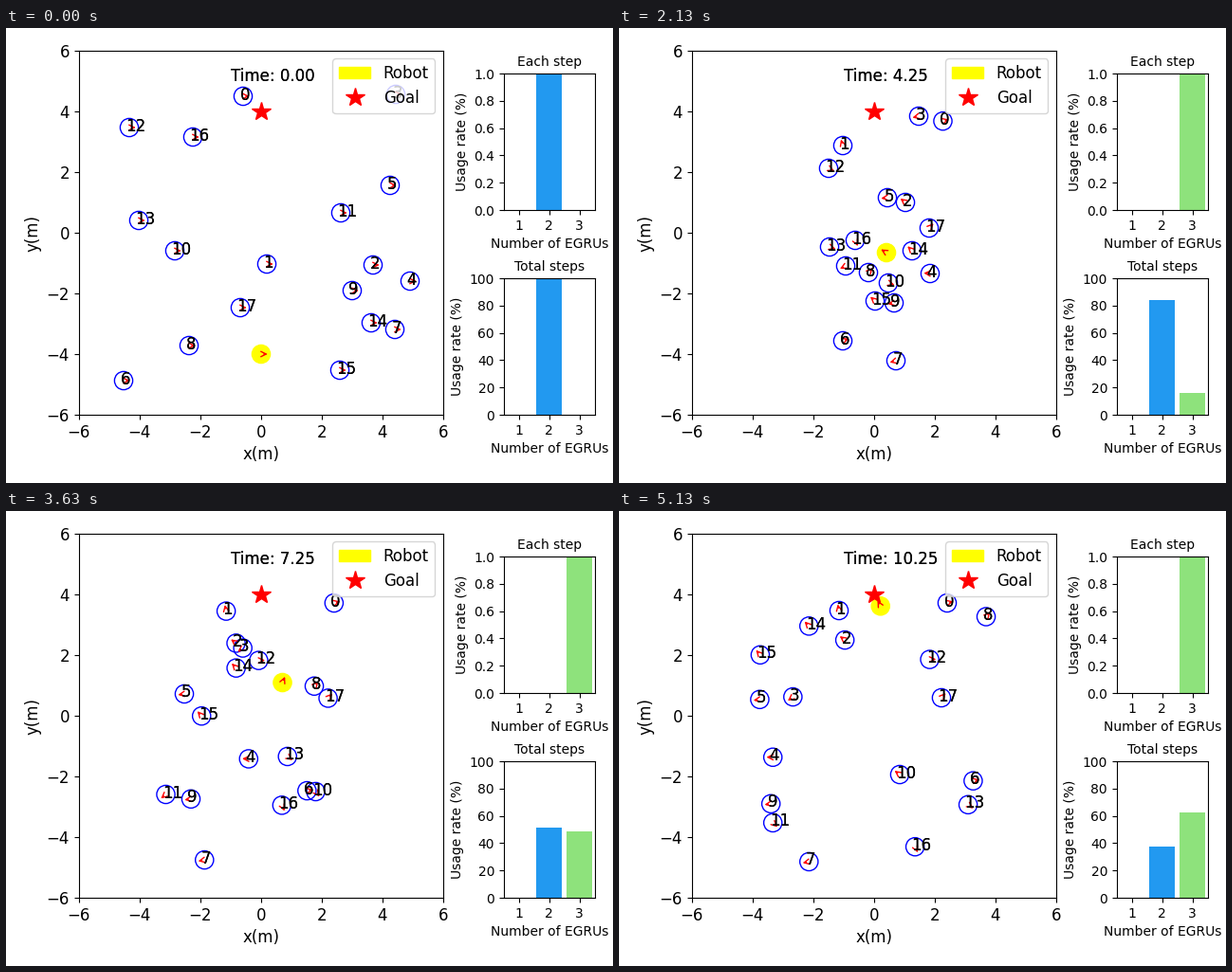
These frames come from a looping animation (640x480 px, 5.26 s). A matplotlib script:

```python
import numpy as np
import matplotlib.pyplot as plt
from matplotlib.animation import FuncAnimation
from matplotlib.lines import Line2D
from matplotlib.patches import ArrowStyle, Circle, FancyArrowPatch

LOOP_MS, STEPS, STEP = 5260, 42, 0.25
REPEAT = 3                     # drawn frames per simulation step
FRAMES = STEPS * REPEAT + 1    # the last step is held one frame longer
RADIUS, LABEL_OFFSET = 0.3, 0.11
STOPS = (17, 25, 33)           # steps at which walkers pass their stops
SWITCH = 15                    # step at which the unit count goes from 2 to 3
BAR_COLORS = ("white", "#2299f0", "#8ee27c")

plt.rcParams.update({"font.family": "DejaVu Sans", "font.size": 10})


def walk(start, stops, goal, steps=STOPS, speed=8, lag=2.3):
    """Ease off from start, pass the stops, then head for the goal and brake."""
    steps = steps[:len(stops)]
    t = np.arange(steps[-1] + 1.0)
    eased = t - lag * (1 - np.exp(-t / 2.5))
    t = np.where(t < steps[0], eased * steps[0] / eased[steps[0]], t)
    points = np.array([start, *stops], float)
    path = list(np.column_stack([np.interp(t, (0, *steps), axis) for axis in points.T]))
    while len(path) < STEPS:
        way = np.array(goal) - path[-1]
        path.append(path[-1] + way * min(speed / np.hypot(*way), STEP))
    return (np.array(path) - (268.8, 216)) / (32, -32)  # stage pixels to metres


robot_path = walk((269, 344),
                  [(284, 307), (299, 266), (297, 246), (282, 237), (267, 227), (279, 210), (304, 152)],
                  (269, 88), steps=(5, 12, 15, 17, 21, 25, 33), lag=0)

humans = [
    walk((250, 72), [(327, 102)], (346, 97), steps=(12,)),
    walk((275, 249), [(236, 124)], (232, 105), lag=0),
    walk((387, 250), [(302, 184)], (238, 136)),
    walk((411, 70), [(316, 93)], (150, 222), speed=7),
    walk((426, 267), [(328, 259), (287, 262)], (120, 259), speed=7.8),
    walk((405, 166), [(283, 179)], (147, 199)),
    walk((124, 372), [(236, 330), (291, 300)], (377, 284), speed=6.7),
    walk((410, 318), [(292, 351)], (200, 370)),
    walk((193, 335), [(263, 258)], (412, 82), lag=3.5),
    walk((365, 277), [(290, 290)], (159, 309)),
    walk((178, 235), [(284, 269), (319, 286), (334, 306)], (262, 253), speed=5.9),
    walk((353, 195), [(239, 251), (189, 282), (148, 316)], (180, 345), speed=2.4, lag=1),
    walk((130, 105), [(221, 148), (246, 158)], (360, 156), speed=5.1),
    walk((140, 203), [(222, 231), (273, 242)], (395, 329), speed=7.3),
    walk((385, 311), [(309, 235)], (198, 119), lag=3),
    walk((352, 361), [(270, 288)], (142, 144)),
    walk((197, 115), [(249, 224)], (313, 356)),
    walk((247, 295), [(327, 211)], (340, 197)),
]


def add_bars(bottom, title, top, ticks):
    ax = fig.add_axes((0.82, bottom, 0.15, 0.3))
    ax.set(xlim=(0.5, 3.5), ylim=(0, top), xticks=(1, 2, 3), yticks=ticks,
           xlabel="Number of EGRUs", ylabel="Usage rate (%)")
    ax.set_title(title, fontsize=10)
    return ax.bar((1, 2, 3), (0, 0, 0), width=0.85, color=BAR_COLORS)


def add_arrow():
    arrow = FancyArrowPatch((0, 0), (RADIUS, 0), color="red",
                            arrowstyle=ArrowStyle("->", head_length=4, head_width=2))
    return ax.add_patch(arrow)


def add_texts(x, y, text):
    # Two overlaid copies give the heavier look of the moving labels.
    return [ax.text(x, y, text, fontsize=12) for _ in range(2)]


fig = plt.figure(figsize=(6.4, 4.8), dpi=100, facecolor="white")
ax = fig.add_axes((0.12, 0.15, 0.6, 0.8))
ax.set(xlim=(-6, 6), ylim=(-6, 6), xticks=range(-6, 7, 2), yticks=range(-6, 7, 2))
ax.tick_params(labelsize=12)
ax.set_xlabel("x(m)", fontsize=12)
ax.set_ylabel("y(m)", fontsize=12)

robot = ax.add_patch(Circle((0, -4), RADIUS, color="yellow"))
goal_star = ax.add_line(Line2D([0], [4], color="red", marker="*", linestyle="None", markersize=15))
ax.legend([robot, goal_star], ["Robot", "Goal"], fontsize=12, loc="upper right")

circles = [ax.add_patch(Circle(path[0], RADIUS, fill=False, color="b")) for path in humans]
labels = [add_texts(0, 0, str(i)) for i in range(len(humans))]
paths = [robot_path] + humans
arrows = [add_arrow() for _ in paths]
clock = add_texts(-1, 5, "Time: 0.00")

step_bars = add_bars(0.6, "Each step", 1, np.linspace(0, 1, 6))
total_bars = add_bars(0.15, "Total steps", 100, range(0, 101, 20))


def heading(path, step):
    if step == 0:
        return np.array([1.0, 0.0])
    dx, dy = path[step] - path[step - 1]
    angle = np.arctan2(dy, dx)
    return np.array([np.cos(angle), np.sin(angle)])


def update(frame):
    step = min(frame // REPEAT, STEPS - 1)
    robot.set_center(robot_path[step])
    for path, circle, texts in zip(humans, circles, labels):
        circle.set_center(path[step])
        for text in texts:
            text.set_position(path[step] - LABEL_OFFSET)
    for path, arrow in zip(paths, arrows):
        arrow.set_positions(path[step], path[step] + RADIUS * heading(path, step))
    for text in clock:
        text.set_text(f"Time: {step * STEP:.2f}")

    two = 100 * min(1, (SWITCH + 1) / (step + 2))
    for bar, now, total in zip((1, 2), (step < SWITCH, step >= SWITCH), (two, 100 - two)):
        step_bars[bar].set_height(float(now))
        total_bars[bar].set_height(total)


anim = FuncAnimation(fig, update, frames=FRAMES, init_func=lambda: update(0),
                     interval=LOOP_MS / FRAMES, repeat=True, repeat_delay=0, blit=False)
plt.show()
```
